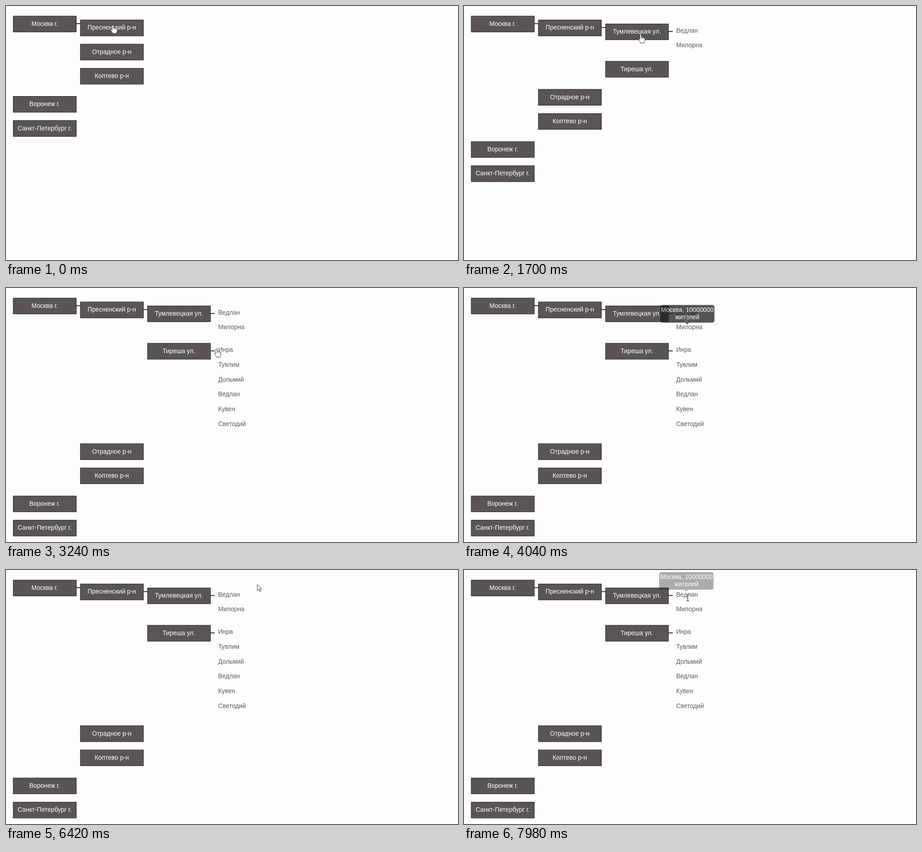
Animation of 998 by 561 pixels, one loop 8000 ms. Source, as an HTML page:

```html
<!DOCTYPE html>
<html lang="ru">
<head>
<meta charset="utf-8">
<style>
html, body { margin: 0; width: 100%; height: 100%; overflow: hidden; background: #fdfdfc; }
body { position: relative; font: 13.8px/15.6px "Liberation Sans", Arial, sans-serif; }
div, svg { position: absolute; left: 0; top: 0; white-space: nowrap; }
.box { width: 139.5px; height: 36px; box-sizing: border-box; border: 1px solid #2c2a33; background: #5a5554; color: #fff; text-align: center; line-height: 34px; }
.line { height: 1.7px; background: #303030; }
.name { color: #5a5b5e; }
#tip { width: 120px; height: 39px; padding-top: 3.4px; box-sizing: border-box; border-radius: 5px; background: #1e1e1e; color: #fff; text-align: center; }
#tip::after { content: ""; position: absolute; left: 55.5px; top: 38.5px; border: 4.5px solid transparent; border-top-color: #1e1e1e; border-bottom: 0; }
svg { overflow: visible; width: 1px; height: 1px; }
#beam { mix-blend-mode: difference; }
</style>
</head>
<body>
<div id="tree"></div>
<div id="tip">Москва, 10000000<br>жителей</div>
<svg id="hand"><path d="M-1.7 1Q0-1 1.7 1V6.2Q3.6 5.2 4.6 6.9Q6.6 6 7.4 7.7Q9.4 7.2 9.6 9.4V13Q9.4 15 8 16.6V18.6H-.8V17Q-3 14.7-4.6 11.6Q-5.4 9.4-3.4 9.3L-1.7 11Z" fill="#fff" stroke="#333" stroke-width="1"/><path d="M1.7 6V10M4.6 7V10M7.4 8V10.5" stroke="#444" stroke-width=".8"/></svg>
<svg id="arrow"><path d="M0 0V13.5L3.1 10.7L5.2 15.5L7.2 14.6L5.2 9.9H9.5Z" fill="#fff" stroke="#333" stroke-width="1"/></svg>
<svg id="beam"><path d="M-3.2-7H-1Q0-7 0-6Q0-7 1-7H3.2M0-6V6M-3.2 7H-1Q0 7 0 6Q0 7 1 7H3.2" fill="none" stroke="#ddd" stroke-width="1.1"/></svg>
<script>
const LOOP = 8000, ROW = 53.35, NAME_ROW = 32.65, PAD = 8.65, FADE = 480;
const $ = id => document.getElementById(id);

// Each branch opens at a given time; strings inside a street are residents.
const branch = (label, opens = Infinity, children = []) => ({ label, opens, children });
const cities = [
  branch('Москва г.', 0, [
    branch('Пресненский р-н', 400, [
      branch('Тумлевецкая ул.', 1250, ['Ведлан', 'Милорна']),
      branch('Тиреша ул.', 2780, ['Инра', 'Тувлим', 'Дольмий', 'Ведлан', 'Кувен', 'Светодий']),
    ]),
    branch('Отрадное р-н'),
    branch('Коптево р-н'),
  ]),
  branch('Воронеж г.'),
  branch('Санкт-Петербург г.'),
];

// Pointer path: time, x, y of the hot spot
const path = [
  [0, 236, 42], [400, 236, 42], [1050, 385, 58], [1250, 385, 58], [1700, 390, 63],
  [2000, 391, 66], [2600, 392, 132], [2800, 392, 132], [3240, 465, 134], [3400, 478, 132],
  [3780, 491, 92], [4040, 491, 66], [4400, 489, 50], [5480, 487, 47], [5700, 495, 44],
  [5860, 520, 36], [6420, 555, 32], [6600, 536, 36], [7400, 528, 58], [7860, 495, 62], [LOOP, 494, 61],
];

const tips = [
  { from: 3800, to: 5860, x: 433, y: 37.5 },
  { from: 7886, to: LOOP, x: 431, y: 4.5 },
];

const clamp = v => Math.max(0, Math.min(1, v));
const easeOut = v => 1 - (1 - clamp(v)) ** 2;
const place = (el, x, y) => { el.style.transform = `translate(${x}px, ${y}px)`; };

function add(type, x, y, text = '') {
  const el = document.createElement('div');
  el.className = type;
  el.textContent = text;
  place(el, x, y);
  $('tree').append(el);
  return el;
}

// Draws a branch and returns the height it takes up.
function drawBranch(node, x, y, t) {
  add('box', x, y, node.label);
  if (t < node.opens) return ROW;
  add('line', x + 139, y + 16.2).style.width = '10px';
  let height = 0;
  for (const child of node.children) {
    if (typeof child === 'string') {
      add('name', x + 156.4, y + height + 7.6, child);
      height += NAME_ROW;
    } else {
      height += drawBranch(child, x + 148.2, y + PAD + height, t);
    }
  }
  return height + 2 * PAD;
}

function drawTree(t) {
  $('tree').replaceChildren();
  let y = 21.8;
  for (const city of cities) y += drawBranch(city, 15.6, y, t);
}

function drawTip(t) {
  const tip = tips.find(p => t >= p.from && t < p.to + FADE);
  $('tip').style.opacity = tip ? easeOut((t - tip.from) / FADE) * (1 - easeOut((t - tip.to) / FADE)) : 0;
  if (tip) place($('tip'), tip.x, tip.y);
}

function drawPointer(t) {
  const i = path.findIndex(p => p[0] > t);
  const [a, b] = [path[i - 1], path[i]];
  const u = (t - a[0]) / (b[0] - a[0]), k = u * u * (3 - 2 * u);
  const shape = t < 3480 ? 'hand' : t < 5840 || t >= 7820 ? 'beam' : 'arrow';
  for (const id of ['hand', 'beam', 'arrow']) $(id).style.display = id === shape ? 'block' : 'none';
  place($(shape), a[1] + (b[1] - a[1]) * k, a[2] + (b[2] - a[2]) * k);
}

const start = performance.now();
let openCount = -1;
function frame() {
  const t = (performance.now() - start) % LOOP;
  const count = [400, 1250, 2780].filter(open => t >= open).length;
  if (count !== openCount) drawTree(t);
  openCount = count;
  drawTip(t);
  drawPointer(t);
  requestAnimationFrame(frame);
}
frame();
</script>
</body>
</html>
```
